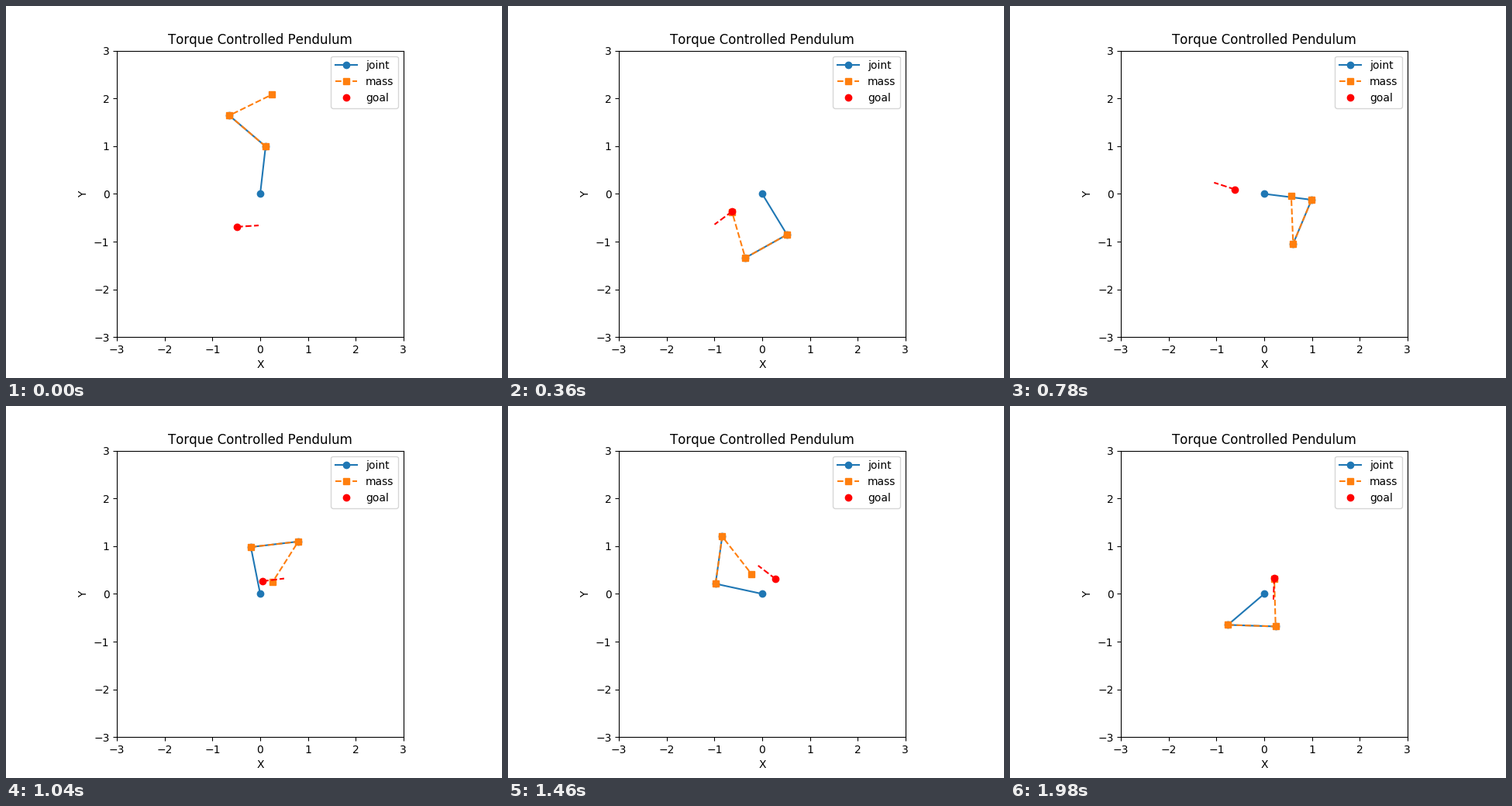
These frames come from a looping animation (640x480 px, 2000 ms). A matplotlib script:

```python
import numpy as np
import matplotlib.pyplot as plt
from matplotlib.animation import FuncAnimation

FRAMES, STEP_MS = 100, 20
TAIL = 0.455

# Key moments: step, absolute link angles, goal position, goal heading
KEYS = [
    (0, (83.5, 139.6, 26.1), (-0.487, -0.69), 183.6),
    (18, (301.3, 209.1, 106.1), (-0.633, -0.37), 36.6),
    (39, (352.9, 247.3, 92.3), (-0.617, 0.095), -18),
    (52, (461.3, 366.6, 237.6), (0.05, 0.266), 187),
    (73, (527.8, 442, 308), (0.276, 0.315), -37.5),
    (88, (653.2, 409, 471.8), (0.685, 0.77), 120),
    (99, (580.5, 358.1, 451.6), (0.21, 0.335), 88),
]
steps, poses, goals, headings = (np.array(c, float) for c in zip(*KEYS))
slopes = np.gradient(poses, steps, axis=0)


def direction(degrees):
    a = np.radians(degrees)
    return np.stack([np.cos(a), np.sin(a)], axis=-1)


def link_angles(step):
    """Cubic Hermite blend between the key poses."""
    k = min(np.searchsorted(steps, step, side="right") - 1, len(steps) - 2)
    span = steps[k + 1] - steps[k]
    u = (step - steps[k]) / span
    ease = u * u * (3 - 2 * u)
    swing = u * (1 - u) * ((1 - u) * slopes[k] - u * slopes[k + 1])
    return poses[k] + ease * (poses[k + 1] - poses[k]) + span * swing


def arm(step):
    """Points from the base to the tip; every link has length 1."""
    links = direction(link_angles(step))
    return np.vstack([[0, 0], np.cumsum(links, axis=0)])


def goal_line(step):
    """The goal jumps halfway between key moments."""
    k = np.argmin(abs(steps - step))
    return np.array([goals[k], goals[k] - TAIL * direction(headings[k])])


plt.rcParams["text.kerning_factor"] = 6
fig, ax = plt.subplots(figsize=(6.4, 4.8), dpi=100)
ax.set_aspect("equal")
ax.set(xlim=(-3, 3), ylim=(-3, 3), xlabel="X", ylabel="Y",
       xticks=range(-3, 4), yticks=range(-3, 4),
       title="Torque Controlled Pendulum")

joint, = ax.plot([], [], "o-", color="C0", label="joint")
mass, = ax.plot([], [], "s--", color="C1", label="mass")
tail, = ax.plot([], [], "r--")
goal, = ax.plot([], [], "ro", label="goal")
ax.legend(loc="upper right")


def update(step):
    points, line = arm(step), goal_line(step)
    joint.set_data(*points[:3].T)
    mass.set_data(*points[1:].T)
    tail.set_data(*line.T)
    goal.set_data(*line[:1].T)
    return joint, mass, tail, goal


anim = FuncAnimation(fig, update, frames=FRAMES, interval=STEP_MS, repeat=True)
plt.show()
```
